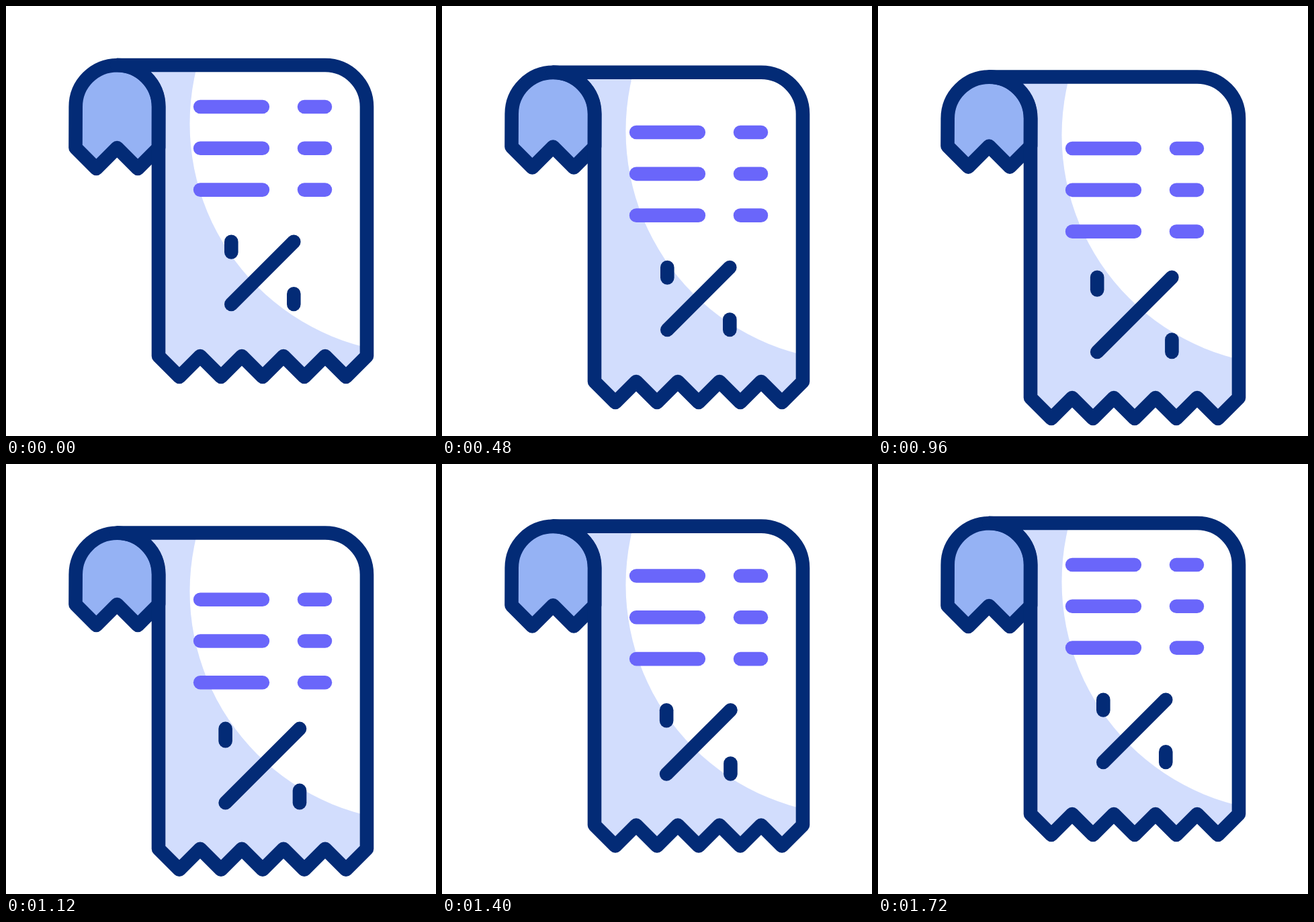
Animation, 640 px wide and 640 px high, one loop 1920 ms. Source, as an HTML page with a canvas:

```html
<!DOCTYPE html>
<html lang="en">
<head>
<meta charset="utf-8">
<title>Receipt</title>
<style>
  html, body { margin: 0; height: 100%; overflow: hidden; background: #fff; }
  canvas { display: block; width: 100vw; height: 100vh; }
</style>
</head>
<body>
<canvas id="stage" width="640" height="640"></canvas>
<script>
const ctx = document.getElementById('stage').getContext('2d');
const LOOP = 1920, STEP = 40;
const NAVY = '#032b76', PURPLE = '#6a66fa', SHADE = '#d2ddfd', CURL = '#95b2f4';
const STROKE = 20.6, R = 62, LEFT = 103.5, FOLD = 227, RIGHT = 537;

// Symmetric cubic-bezier ease (0.475, 0, 0.525, 1), solved by bisection.
function ease(x) {
  if (x <= 0 || x >= 1) return x <= 0 ? 0 : 1;
  let lo = 0, hi = 1, s;
  for (let i = 0; i < 24; i++) {
    s = (lo + hi) / 2;
    const at = 1.425 * s * (1 - s) ** 2 + 1.575 * s * s * (1 - s) + s ** 3;
    if (at < x) lo = s; else hi = s;
  }
  return s * s * (3 - 2 * s);
}

// Rises from 0 to 1 at the peak, then returns to 0.
function swell(t, start, peak, end) {
  return t < peak ? ease((t - start) / (peak - start)) : ease((end - t) / (end - peak));
}

function line(x1, y1, x2, y2, color) {
  ctx.strokeStyle = color;
  ctx.beginPath();
  ctx.moveTo(x1, y1);
  ctx.lineTo(x2, y2);
  ctx.stroke();
}

function bar(cx, y, length, color) {
  const half = (length - STROKE) / 2;
  line(cx - half, y, cx + half, y, color);
}

function sheetPath(top, bottom) {
  const p = new Path2D();
  p.moveTo(LEFT + R, top);
  p.arcTo(RIGHT, top, RIGHT, top + R, R);
  for (let i = 0; i <= 10; i++) p.lineTo(RIGHT - i * 31, bottom + (i % 2) * 31);
  p.lineTo(FOLD, top + R);
  p.arc(FOLD - R, top + R, R, 0, -Math.PI / 2, true);
  return p;
}

function curlPath(top, bottom) {
  const p = new Path2D();
  p.arc(LEFT + R, top + R, R - 0.2, 0, Math.PI, true);
  for (let i = 0; i <= 4; i++) p.lineTo(LEFT + i * 30.9, bottom + (i % 2) * 31);
  p.closePath();
  return p;
}

function draw(t) {
  const pull = swell(t, 40, 840, 1720);
  const drop = 64 * pull, top = 88 + 18 * pull;
  const sheet = sheetPath(top, 521 + drop);
  const curl = curlPath(top, 211 - 2.5 * pull);

  ctx.fillStyle = '#fff';
  ctx.fillRect(0, 0, 640, 640);
  ctx.lineWidth = STROKE;
  ctx.lineCap = ctx.lineJoin = 'round';

  ctx.fillStyle = SHADE;
  ctx.fill(sheet);
  ctx.save();
  ctx.clip(sheet);
  ctx.fillStyle = '#fff';
  ctx.beginPath();
  ctx.arc(616.3, top + 87, 342.8, 0, 2 * Math.PI);
  ctx.fill();
  ctx.restore();

  ctx.fillStyle = CURL;
  ctx.fill(curl);
  ctx.strokeStyle = NAVY;
  ctx.stroke(curl);
  ctx.stroke(sheet);

  for (let i = 0; i < 3; i++) {
    const start = 120 + 95 * i;
    const width = 1 - 0.24 * swell(t, start, start + 620, start + 1240);
    const y = 150 + 61.8 * i + drop;
    bar(335.5, y, 113.3, PURPLE, width);
    bar(459.5, y, 51.5, PURPLE, width);
  }

  const grow = 1 + 0.2 * swell(t, 505, 1020, 1535);
  const cx = 381.8, cy = 397.4 + drop, far = 46.5 * grow, near = 31 * grow;
  line(cx - far, cy + far, cx + far, cy - far, NAVY);
  line(cx - far, cy - far, cx - far, cy - near, NAVY);
  line(cx + far, cy + near, cx + far, cy + far, NAVY);
}

function tick() {
  // Poses change 25 times a second.
  draw(Math.floor(performance.now() % LOOP / STEP + 0.1) * STEP % LOOP);
  requestAnimationFrame(tick);
}
tick();
</script>
</body>
</html>
```
